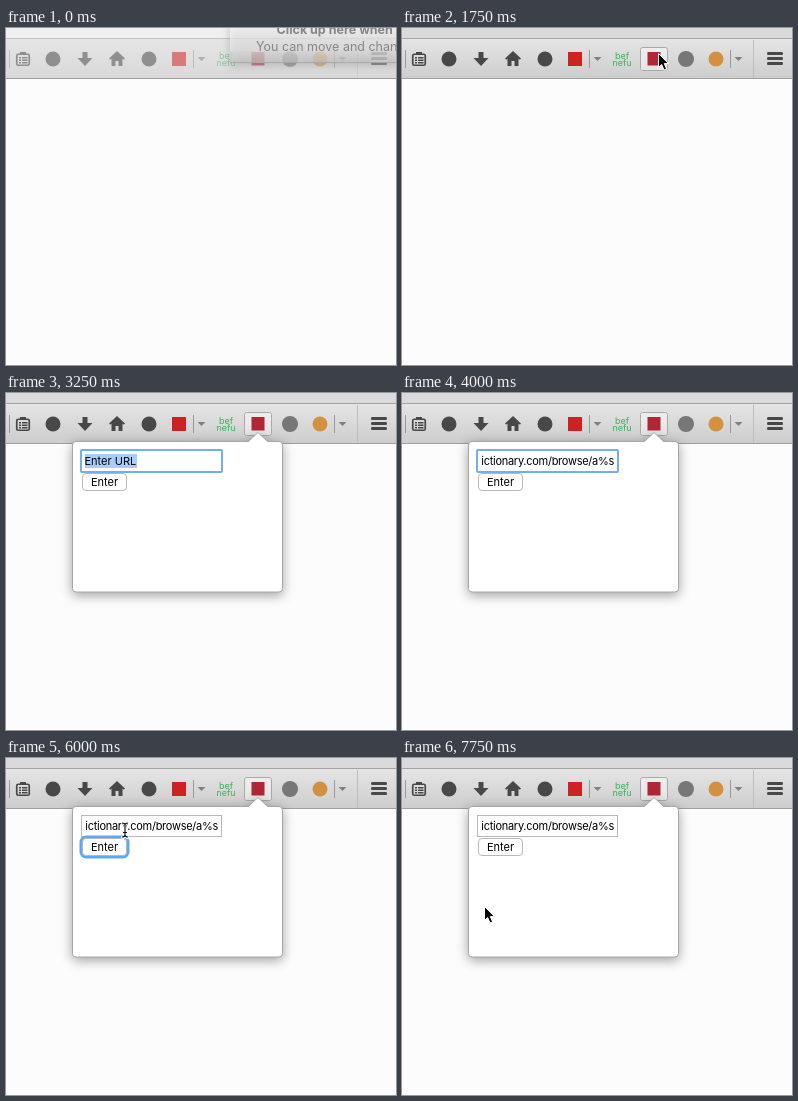
An HTML page that plays this animation: 390x337 px, repeating every 8000 ms.

```html
<!DOCTYPE html>
<html lang="en">
<head>
<meta charset="utf-8">
<title>Toolbar popup</title>
<style>
html, body { margin: 0; width: 100%; height: 100%; overflow: hidden; background: #fcfcfc; }
svg { display: block; width: 390px; height: 337px; }
text { font-family: Inter, "Liberation Sans", sans-serif; font-size: 11px; }
.loop { animation: 8s step-end infinite; }

#hint { animation-name: hint; }
#dim { animation-name: dim; }
#hoverBadge { animation-name: hover-badge; }
#hoverBook { animation-name: hover-book; }
#bookEdge { animation-name: book-edge; }
#popup { animation-name: popup; }
#dots { animation-name: dots; }
#inputRing { animation-name: input-ring; }
#selection { animation-name: selection; }
#prompt { animation-name: prompt; }
#address { animation-name: address; letter-spacing: -.27px; }
#caret { animation-name: caret; }
#buttonRing { animation-name: button-ring; }
#pressed { animation-name: pressed; }
#arrow { animation-name: arrow; }
#beam { animation-name: beam; }
#frame { filter: drop-shadow(0 3px 6px rgba(0,0,0,.36)); }

@keyframes hint { 0% { opacity: 1 } 3.125%, to { opacity: 0 } }
@keyframes dim { 0% { opacity: 1 } 21.875%, to { opacity: 0 } }
@keyframes hover-badge { 0% { opacity: 0 } 9.375% { opacity: 1 } 12.5%, to { opacity: 0 } }
@keyframes hover-book { 0% { opacity: 0 } 12.5%, to { opacity: 1 } }
@keyframes book-edge { 0% { opacity: 0 } 15.625%, to { opacity: 1 } }
@keyframes popup { 0% { opacity: 0 } 25%, to { opacity: 1 } }
@keyframes dots { 0% { opacity: 0 } 59.375% { opacity: 1 } 62.5%, to { opacity: 0 } }
@keyframes input-ring { 0% { opacity: 0 } 34.375% { opacity: 1 } 59.375%, to { opacity: 0 } }
@keyframes selection { 0% { opacity: 0 } 37.5% { opacity: 1 } 43.75%, to { opacity: 0 } }
@keyframes prompt { 0% { opacity: 1 } 43.75%, to { opacity: 0 } }
@keyframes address { 0% { opacity: 0 } 43.75%, to { opacity: 1 } }
@keyframes caret {
  0% { opacity: 0 } 43.75% { opacity: 1 } 50% { opacity: 0 }
  56.25% { opacity: 1 } 59.375%, to { opacity: 0 }
}
@keyframes button-ring { 0% { opacity: 0 } 62.5% { opacity: 1 } 81.25%, to { opacity: 0 } }
@keyframes pressed { 0% { opacity: 0 } 81.25% { opacity: 1 } 84.375%, to { opacity: 0 } }
@keyframes arrow {
  0% { transform: translate(-40px, 0) }
  9.375% { transform: translate(269px, 22px) }
  12.5% { transform: translate(266px, 26px) }
  15.625% { transform: translate(256px, 25px) }
  28.125% { transform: translate(219px, 46px) }
  31.25% { transform: translate(-40px, 0) }
  78.125% { transform: translate(111px, 88px) }
  81.25% { transform: translate(93px, 81px) }
  90.625% { transform: translate(93px, 83px) }
  93.75% { transform: translate(93px, 100px) }
  96.875%, to { transform: translate(82px, 148px) }
}
@keyframes beam {
  0% { transform: translate(-40px, 0) }
  31.25% { transform: translate(203px, 56px) }
  34.375% { transform: translate(195px, 66px) }
  37.5% { transform: translate(20px, 66px) }
  40.625% { transform: translate(-40px, 0) }
  75% { transform: translate(119px, 72px) }
  78.125%, to { transform: translate(-40px, 0) }
}
</style>
</head>
<body>
<svg viewBox="0 0 390 337">
  <defs>
    <linearGradient id="bar" x2="0" y2="1">
      <stop stop-color="#e5e5e5"/><stop offset="1" stop-color="#cdcdcd"/>
    </linearGradient>
    <linearGradient id="glass" x2="0" y2="1">
      <stop stop-color="#fafafa" stop-opacity=".75"/>
      <stop offset=".65" stop-color="#eee" stop-opacity=".6"/>
      <stop offset="1" stop-color="#c4c4c4" stop-opacity=".6"/>
    </linearGradient>
    <clipPath id="field"><rect x="79" y="58" width="135" height="20"/></clipPath>
  </defs>

  <!-- toolbar -->
  <rect width="390" height="10" fill="#dadada"/>
  <rect y="10" width="390" height="1" fill="#a3a3a3"/>
  <rect y="11" width="390" height="39" fill="url(#bar)"/>
  <rect y="50" width="390" height="1" fill="#a0a0a0"/>

  <rect class="loop" id="hoverBadge" x="269" y="19" width="28" height="25" rx="2" fill="#fff" opacity="0" fill-opacity=".55"/>
  <rect class="loop" id="hoverBook" x="238" y="19" width="28" height="24" rx="2" fill="#fff" opacity="0" fill-opacity=".45"/>
  <rect class="loop" id="bookEdge" x="238.5" y="19.5" width="27" height="23" rx="2" fill="none" stroke="#a9a9a9" opacity="0"/>

  <g fill="#484848">
    <path fill="#999" d="M3 22h1v18h-1zM187 22h1v18h-1zM328 22h1v18h-1z"/>
    <path fill="#bdbdbd" d="M351 12h1v38h-1z"/>
    <rect x="10.75" y="26.25" width="12.5" height="11" rx="1.5" fill="none" stroke="#484848" stroke-width="1.7"/>
    <path d="M14 24h6v3h-6zM13 29h2v1.5h-2zM16 29h5.500v1.500h-5.500zM13 31.500h2v1.500h-2zM16 31.500h5.500v1.500h-5.500zM13 34h2v1.500h-2zM16 34h5.500v1.500h-5.500z"/>
    <circle cx="47" cy="31" r="7.500"/>
    <path d="M76.500 24h5v6h5l-7.500 8-7.500-8h5z"/>
    <path d="M111 23l8 7.500-1.200 1.300-1.300-1.200v7.400h-4v-5h-3v5h-4v-7.400l-1.300 1.200-1.200-1.300z"/>
    <circle cx="143" cy="31" r="7.500"/>
    <rect x="166" y="24" width="14" height="14" fill="#cc2222"/>
    <path fill="#808080" d="M191.500 29h8l-4 4zM332.500 29h8l-4 4z"/>
    <rect x="245.500" y="24" width="13" height="13.500" fill="#b02735"/>
    <circle cx="284" cy="31" r="8" fill="#777"/>
    <circle cx="314" cy="31" r="7.500" fill="#d3913f"/>
    <path d="M366 24h14q1 0 1 1.500t-1 1.500h-14q-1 0-1-1.500t1-1.500zm0 5h14q1 0 1 1.500t-1 1.500h-14q-1 0-1-1.500t1-1.500zm0 5h14q1 0 1 1.500t-1 1.500h-14q-1 0-1-1.500t1-1.500z"/>
  </g>
  <g fill="#35b558" text-anchor="middle">
    <text x="220" y="30.500" style="font-size:9px">bef</text>
    <text x="220" y="37.500" style="font-size:9px">nefu</text>
  </g>

  <g class="loop" id="dim">
    <rect width="390" height="10" fill="#fff" fill-opacity=".6"/>
    <rect y="10" width="390" height="40" fill="#e6e6e6" fill-opacity=".45"/>
  </g>

  <!-- fading hint -->
  <g class="loop" id="hint" fill="#868686">
    <path d="M224 -5h170v40h-170z" fill="url(#glass)" style="filter:drop-shadow(0 2px 5px rgba(0,0,0,.3))"/>
    <path d="M224 34.500h166" stroke="#aaa"/>
    <text x="270.500" y="5.500" font-weight="700" style="font-size:12.500px">Click up here when</text>
    <text x="250" y="23" style="font-size:12.500px">You can move and change</text>
  </g>

  <!-- popup -->
  <g class="loop" id="popup" opacity="0">
    <path id="frame" fill="#fff" stroke="#a6a6a6" d="M70 48.500H242.500L252 39.500L261.500 48.500H273Q276.500 48.500 276.500 52V195.500Q276.500 199 273 199H70Q66.500 199 66.500 195.500V52Q66.500 48.500 70 48.500Z"/>
    <path class="loop" id="dots" d="M67.500 49.500H275.500V198.500H67.500Z" fill="none" stroke="#000" stroke-dasharray="1 1"/>

    <rect x="75.500" y="57.500" width="140" height="21" fill="#fff" stroke="#b9b9b9"/>
    <rect class="loop" id="inputRing" x="75" y="57" width="141" height="22" rx="1" fill="none" stroke="#74adf0" stroke-width="2"/>
    <rect class="loop" id="selection" x="79" y="61" width="52" height="14" fill="#a8cdf8"/>
    <text class="loop" id="prompt" x="78.500" y="72">Enter URL</text>
    <g clip-path="url(#field)">
      <text class="loop" id="address" x="212" y="72" text-anchor="end">http://dictionary.com/browse/a%s</text>
    </g>
    <rect class="loop" id="caret" x="212" y="61" width="1" height="14"/>

    <rect class="loop" id="buttonRing" x="75" y="79" width="47" height="20" rx="5" fill="none" stroke="#5ea6f6" stroke-width="3"/>
    <rect x="76.500" y="80.500" width="44" height="17" rx="3.500" fill="#fff" stroke="#b8b8b8"/>
    <text x="98.500" y="93" text-anchor="middle">Enter</text>
    <g class="loop" id="pressed">
      <rect x="76" y="80" width="45" height="18" rx="4" fill="#3d8df5"/>
      <text x="98.500" y="93" text-anchor="middle" fill="#fff">Enter</text>
    </g>
  </g>

  <!-- pointers -->
  <path class="loop" id="arrow" d="M.5 .5V14.500L3.700 11.500L6 17L8.600 15.900L6.300 10.600H10.500Z" stroke="#fff" stroke-width="1"/>
  <g class="loop" id="beam" fill="none">
    <path id="stem" d="M-3.500 -7.500Q0 -7.500 0 -5V5Q0 7.500 -3.500 7.500M3.500 -7.500Q0 -7.500 0 -5V5Q0 7.500 3.500 7.500M-2 2.500H2" stroke="#fff" stroke-width="2.600"/>
    <use href="#stem"/>
    <path d="M-3 -7Q0 -7 0 -5V5Q0 7 -3 7M3 -7Q0 -7 0 -5V5Q0 7 3 7M-2 2.500H2" stroke="#111" stroke-width="1.200"/>
  </g>
</svg>
</body>
</html>
```
